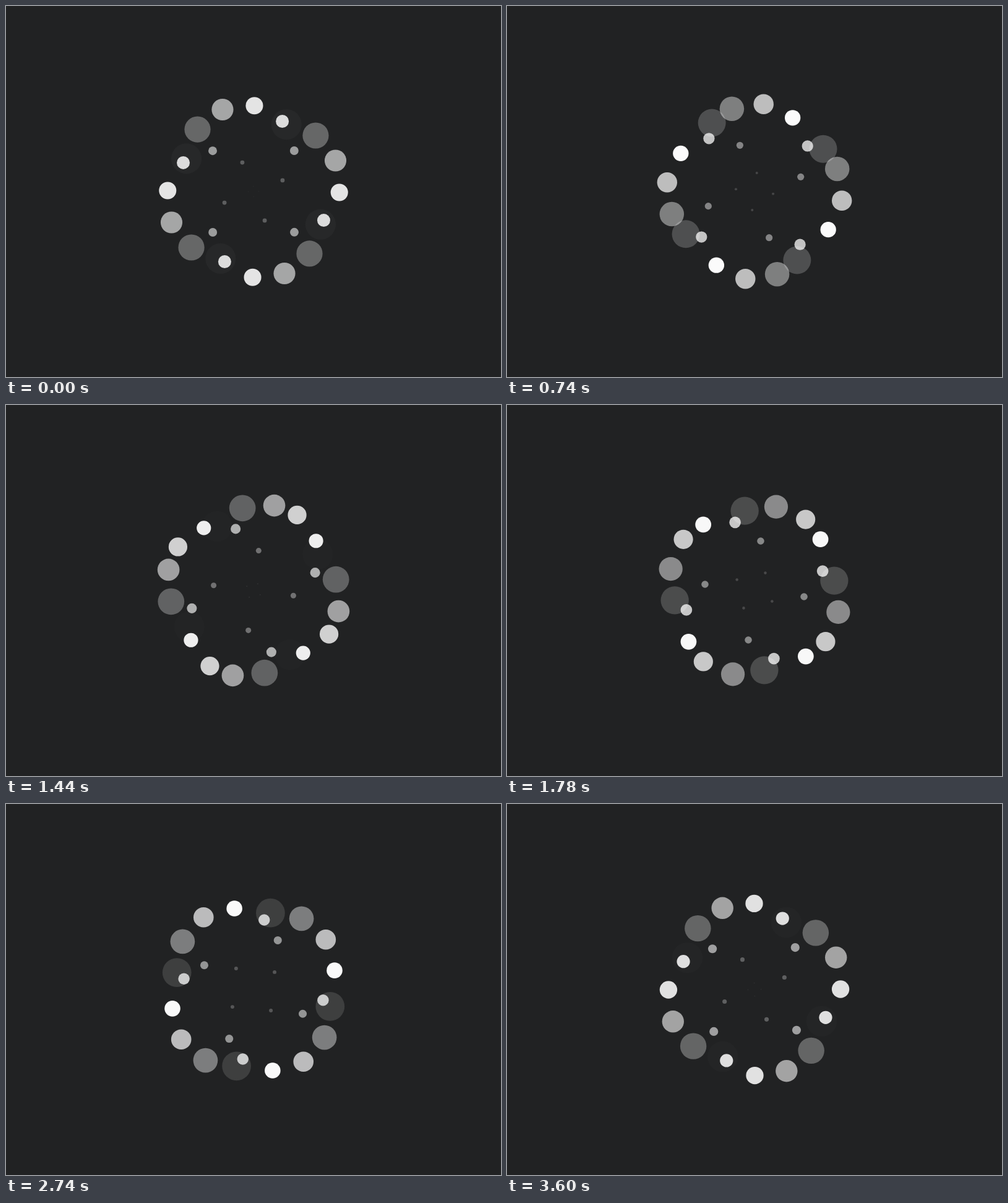
Animation, 800 px wide and 600 px high, one loop 3620 ms. Source, as an HTML page with a canvas:

```html
<!DOCTYPE html>
<html lang="en">
<head>
<meta charset="utf-8">
<title>Spiral loader</title>
<style>
  html, body { margin: 0; width: 100%; height: 100%; overflow: hidden; background: #212223; }
  canvas { display: block; }
</style>
</head>
<body>
<canvas id="stage" width="800" height="600"></canvas>
<script>
const ctx = document.getElementById('stage').getContext('2d');
const LOOP = 3620, STEP = 20, LIFE = 3780;
const FIRST = 357, INTERVAL = 535, DOTS = 7, ARMS = 4;
const MAX_SIZE = 25, SPIN = 0.025, START = -18.75;

// p runs from 1 (birth, large) down to 0 (centre, tiny)
function distance(p) {
  const u = p - 0.66;
  return Math.max(0, 142 - (u < 0 ? 335 : 200) * u * u);
}

function twist(p) {
  const u = p - 0.69;
  return -(150 * u + 27.7 * u ** 3);
}

function drawDot(p, t) {
  const r = distance(p);
  const angle = START + SPIN * t + twist(p);
  ctx.globalAlpha = 1 - Math.abs(2 * p - 1);
  for (let arm = 0; arm < ARMS; arm++) {
    const a = (angle + arm * 360 / ARMS) * Math.PI / 180;
    ctx.beginPath();
    ctx.arc(400 + r * Math.cos(a), 300 + r * Math.sin(a), MAX_SIZE * p, 0, Math.PI * 2);
    ctx.fill();
  }
}

function draw(t) {
  ctx.globalAlpha = 1;
  ctx.fillStyle = '#212223';
  ctx.fillRect(0, 0, 800, 600);
  ctx.fillStyle = '#fff';
  for (let i = 0; i < DOTS; i++) {
    let age = (t - FIRST - i * INTERVAL + 2 * LOOP) % LOOP;
    // a dot outlives the loop slightly, so two generations can overlap
    for (; age < LIFE; age += LOOP) drawDot(1 - age / LIFE, t);
  }
}

const begin = performance.now();
function tick() {
  const t = (performance.now() - begin) % LOOP;
  draw(Math.floor(t / STEP) * STEP);
  requestAnimationFrame(tick);
}
tick();
</script>
</body>
</html>
```
